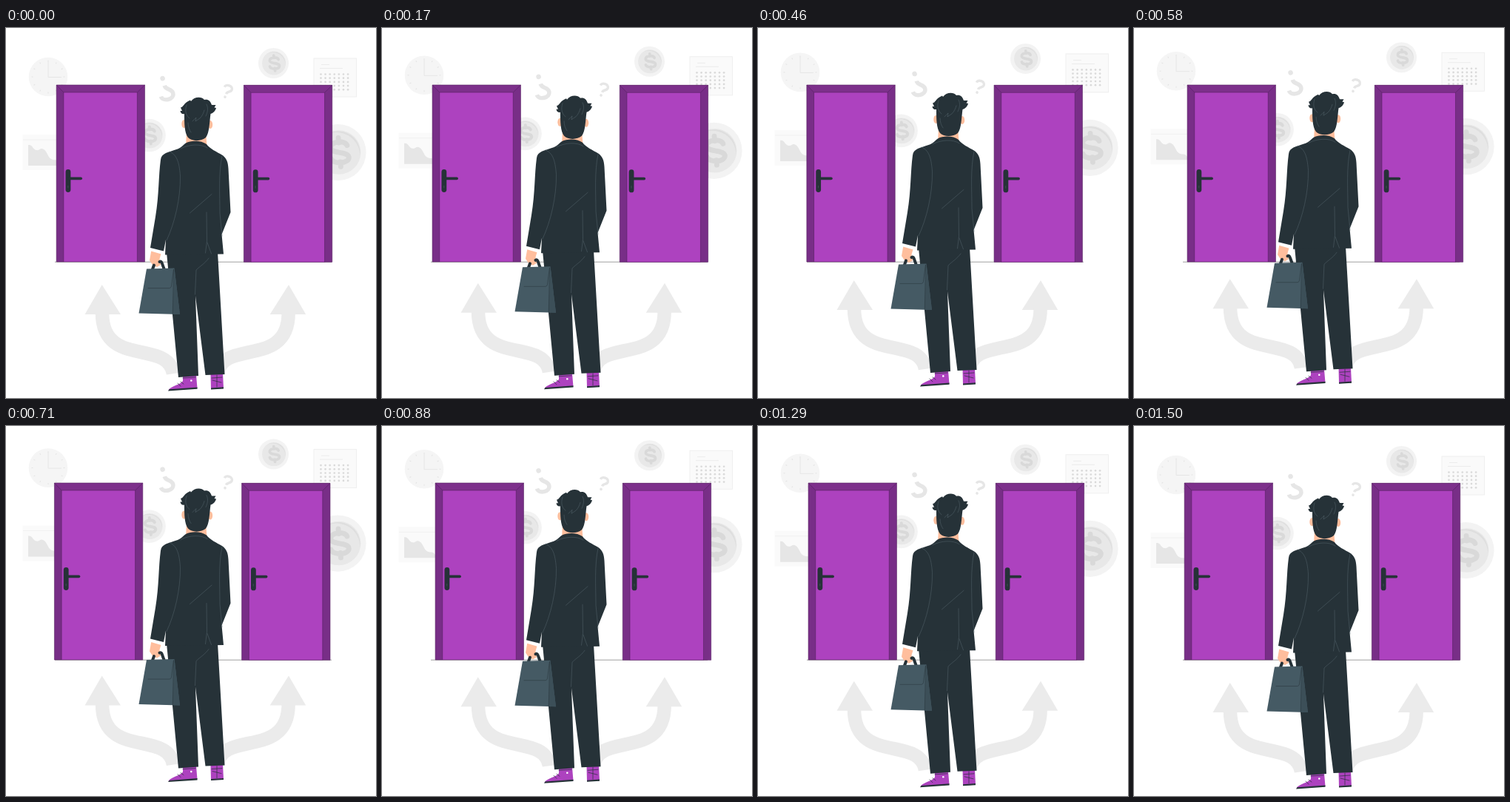
An HTML page for the animation above (1.54 s loop, 500 by 500 pixels).

```html
<!DOCTYPE html>
<html lang="en">
<head>
<meta charset="utf-8">
<title>Two doors</title>
<style>
  html, body { margin: 0; width: 100%; height: 100%; overflow: hidden; background: #fff; }
  svg { display: block; width: 100vw; height: 100vh; }
  .line { fill: none; stroke: #56666e; stroke-width: .5; stroke-linecap: round; stroke-linejoin: round; }
  .ink { fill: none; stroke: #263238; stroke-linecap: round; stroke-linejoin: round; }
</style>
</head>
<body>
<svg viewBox="0 0 500 500">
  <defs>
    <g id="coin">
      <circle r="20.5" fill="#f3f3f3"/>
      <circle cx=".6" r="16" fill="#e8e8e8"/>
      <path d="M-9 -12.5A16 16 0 0 1 16 3A17 17 0 0 0 -9 -12.5" fill="#dedede"/>
      <path d="M6.5 -4.5C5 -9-6-8.5-5.5 -3.5C-5 1 7.5-.5 7 4.5C6.500 9-5 8.500-6 4M.6-10.500V-7M.6 7V10.500"
            transform="translate(.6) rotate(-5)" fill="none" stroke="#d9d9d9" stroke-width="3.7" stroke-linecap="round"/>
    </g>
    <g id="door">
      <path d="M68.300 77H187.700V316H68.300Z" fill="#782e87"/>
      <path d="M68.300 77H187.700L177.700 87H78Z" fill="#7d308b"/>
      <path d="M78 87H177.500V316H78Z" fill="#ad42bf"/>
      <path d="M68.300 77L78 87V316M187.700 77L177.500 87V316M78 87H177.500M68.300 316V77H187.700V316Z"
            fill="none" stroke="#552061" stroke-width=".6"/>
      <rect x="80.700" y="191" width="6.800" height="31" rx="3.400" fill="#263238"/>
      <path class="ink" d="M84 203.300H101.300" stroke-width="3.700"/>
      <path class="line" d="M84 213.300V216"/>
    </g>
    <g id="arrow" fill="#ebebeb">
      <path d="M129.700 347L155 387H106.500Z"/>
      <path d="M130 385C130 460 219 420 226 467" fill="none" stroke="#ebebeb" stroke-width="18.500"/>
    </g>
    <path id="query" d="M-8.500 -6C-8-14 8-15 8.500 -6C8.500 1 0 0 0 7" fill="none" stroke="#e6e6e6" stroke-width="5.500"/>
  </defs>

  <g class="float">
    <circle cx="57" cy="66" r="26.300" fill="#f5f5f5"/>
    <g id="ticks" stroke="#e3e3e3"></g>
    <path d="M57 45V66.500H75" fill="none" stroke="#e6e6e6"/>

    <rect x="22.500" y="144" width="58" height="48" fill="#fafafa"/>
    <path d="M23 151H80" stroke="#f1f1f1"/>
    <path d="M30 186V158C36 157 36 164 41 165C46 166 46 161 51 164C56 167 56 174 61 177C66 180 70 175 74 186Z" fill="#e6e6e6"/>

    <rect x="416" y="41" width="57.500" height="52" fill="#fafafa" stroke="#efefef"/>
    <path d="M426 49.500H437M424 54.500H455" stroke="#ececec"/>
    <g id="dates" fill="#dadada"></g>

    <use href="#coin" transform="translate(361.500 47.500)"/>
    <use href="#coin" transform="translate(193.500 145) scale(1.090)"/>
    <use href="#coin" transform="translate(448.500 168) scale(1.860)"/>

    <g transform="translate(216 84.500) rotate(-15) scale(1 -1)">
      <use href="#query"/><circle cx="0" cy="18" r="3.300" transform="translate(0 -1)" fill="#e6e6e6"/>
    </g>
    <g transform="translate(299 85) rotate(20) scale(.62)">
      <use href="#query"/><circle cy="14" r="3" fill="#e6e6e6"/>
    </g>
  </g>

  <path d="M66 316.200H440" stroke="#777" stroke-width=".7"/>
  <g id="doors">
    <use href="#door"/>
    <use href="#door" x="253.200" y=".3"/>
  </g>

  <g class="float">
    <use href="#arrow"/>
    <use href="#arrow" transform="matrix(-1 0 0 1 511.700 0)"/>

    <!-- shoes -->
    <g fill="#ad42bf">
      <path d="M239 470L257 469L258.500 487L219.500 489.500C222 484 236 482 239 477Z"/>
      <path d="M276.500 467H293L294 487L277 488Z"/>
    </g>
    <path d="M219 490.500L220.500 488.300L258.500 485.500V487.800ZM277 486.500L294 485.300V487.500L277 488.500Z" fill="#263238"/>
    <path class="ink" d="M232 480L236 484M236 478L240 481M239 473L256 472M278 473L292 472M279 476L291 479M285 469V485" stroke-width=".7"/>
    <circle cx="250.300" cy="476.500" r="1.300" fill="#fff"/>

    <!-- trousers -->
    <path d="M217 303H286L295.500 468L269.500 469L256 362L260 470L233 472Z" fill="#263238"/>
    <path class="line" d="M274 311C268 319 263 321 257 327L255.500 360"/>

    <!-- hand -->
    <path d="M196.500 300L210 303.500L207.500 312L209 320L204 323L198 320L194 314Z" fill="#ffbe9d"/>
    <path d="M195 297L214 301L211.500 306L196 301.500Z" fill="#fff"/>

    <!-- bag -->
    <path class="ink" d="M198 326L200 320.500M207.500 316C211 314 211 320 213.500 325" stroke-width="4"/>
    <path d="M190 325.500L227.500 324.500L235 387L179.500 385.500Z" fill="#455a64"/>
    <path d="M227.500 324.500L235 387L225 386.500Z" fill="#3c4f58"/>
    <path class="ink" d="M192 351.500H220C223 351.500 223.500 350 223.700 347L226.500 326L225.300 386" stroke-width=".5"/>

    <!-- neck and ears -->
    <g fill="#ffbe9d">
      <path d="M244 140H270L271.500 160H243Z"/>
      <ellipse cx="240.500" cy="129.500" rx="3.200" ry="5.500"/>
      <ellipse cx="276" cy="130.500" rx="3.200" ry="5.500"/>
    </g>

    <!-- jacket -->
    <path d="M243 155.500C250 151.500 264 151.500 271 157C275 163 286 168 291 171C298 175 300 181 300.500 190L303.500 249L291.500 279L294 305.500L215 306.500L216 286L213 301.500L195 297L202 255C207 225 206 200 209 178C210 169 219 168 232 163.500C238 161 239 158 243 155.500Z" fill="#263238"/>
    <path class="line" d="M221 167C230 171 234 179 235.500 200C236 230 228 264 217 287M292 173C287 195 289 225 289 250L292 281M278 224.500L248.500 250M271 249L271.500 288L269.500 304M272 290L277.500 305M236 163C247 157 264 156 272 162"/>

    <!-- hair -->
    <path d="M241 116C237 117 236 114 235.500 112L238 112L236 107.500C240 107 240 101 249 97.500L250 99C254 93 264 92 268 97C273 96 276 98 278 104L283.500 104L281.500 107.500L284 108C283 112 280 115 276.500 116C275 126 275 142 270 148C264 153.500 251 153.500 246 148C241 141 241 129 241 116Z" fill="#263238"/>
    <path class="line" d="M244 104C241 113 244 119 248 122M246 128C246 134 248 138 250 141M252 126L257 121L256 126L262 122C265 119 267 115 268 111M271 103C274 109 272 115 270 119"/>
  </g>
</svg>
<script>
const LOOP = 1540, CYCLE = 1500, RATE = 24;
const SHAKE = [0, -1, 2, -4, 4, -4, 4, -4, 2, -1, 0];
const floaters = document.querySelectorAll('.float');
const doors = document.getElementById('doors');

function add(parent, tag, attrs) {
  const el = document.createElementNS('http://www.w3.org/2000/svg', tag);
  for (const key in attrs) el.setAttribute(key, attrs[key]);
  parent.append(el);
}

const ticks = document.getElementById('ticks');
for (let i = 0; i < 12; i++)
  add(ticks, 'path', { d: 'M57 43.500V45.500', transform: `rotate(${i * 30} 57 66)` });

const dates = document.getElementById('dates');
for (let i = 0; i < 35; i++)
  add(dates, 'circle', { cx: 425.5 + i % 7 * 6.1, cy: 62.5 + Math.floor(i / 7) * 5.2, r: 1.35 });

function shake(p) {
  const i = Math.min(9, Math.floor(p * 10));
  return SHAKE[i] + (SHAKE[i + 1] - SHAKE[i]) * (p * 10 - i);
}

// Motion is held at 24 steps per second, sampled mid-step.
function draw(now) {
  const step = Math.min(36, Math.floor((now % LOOP + 4.9) * RATE / 1000));
  const p = (step + .5) * 1000 / RATE % CYCLE / CYCLE;
  const y = .3 - 10 * (1 - Math.abs(2 * p - 1));
  floaters.forEach(el => el.setAttribute('transform', `translate(0 ${y})`));
  doors.setAttribute('transform', `translate(${shake(p)} 0)`);
}

let start;
function tick(now) {
  start ??= now;
  draw(now - start);
  requestAnimationFrame(tick);
}
draw(0);
requestAnimationFrame(tick);
</script>
</body>
</html>
```
